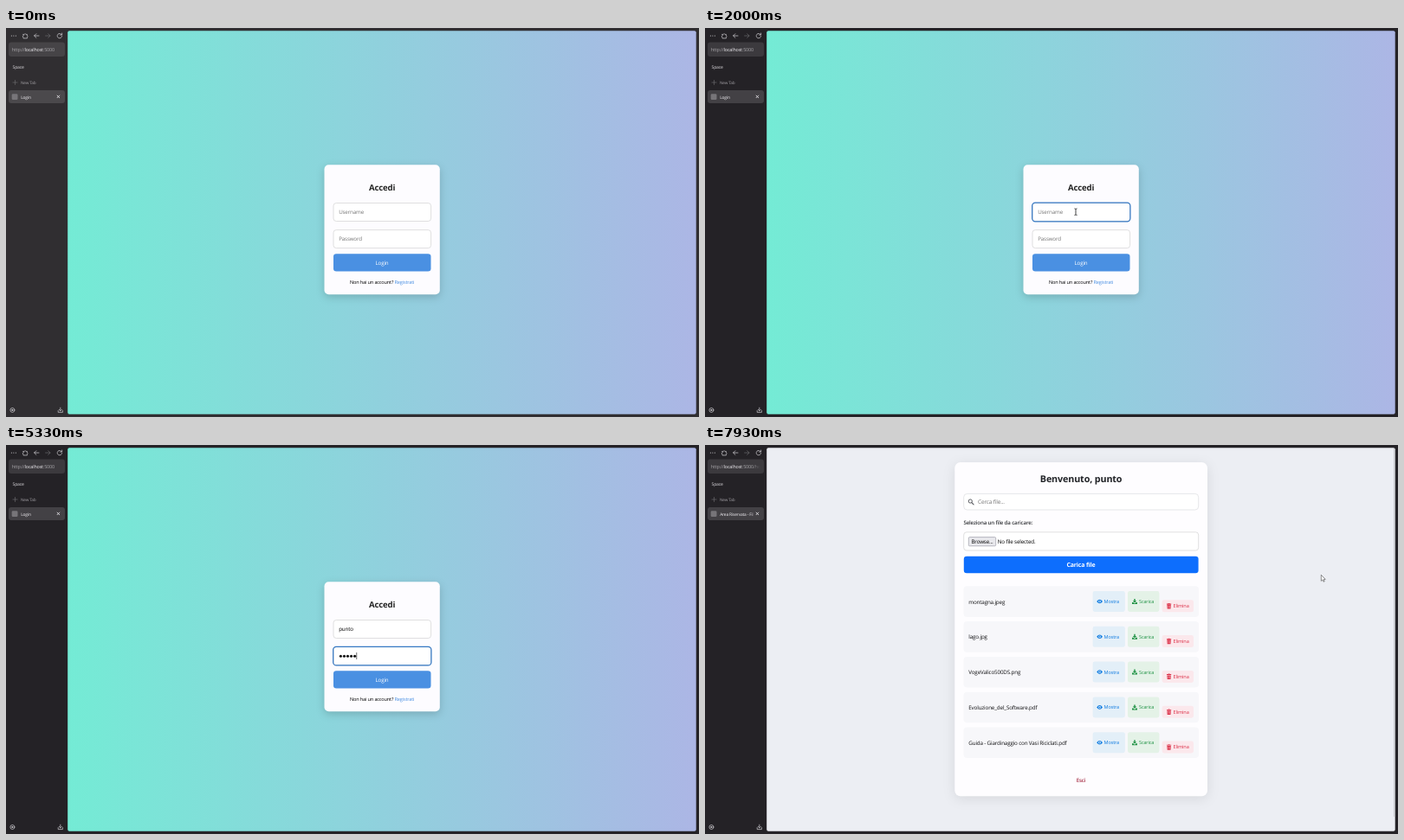
An HTML page for the animation above (8000 ms loop, 800 px wide and 450 px high).

```html
<!DOCTYPE html>
<html lang="it">
<head>
<meta charset="utf-8">
<title>Login</title>
<style>
  html, body { margin: 0; width: 100%; height: 100%; overflow: hidden; background: #242226; }
  svg { display: block; width: 800px; height: 450px; font-weight: 500; letter-spacing: -.01em;
    --frame: #302e31; --box: #464447; --tab: #4b494c; }
  svg.active { --frame: #242226; --box: #3c3a3e; --tab: #434145; }
  text { font-family: "Open Sans", "Noto Sans", sans-serif; text-rendering: geometricPrecision; white-space: pre; }
  .frame { fill: var(--frame); }
  .box { fill: var(--box); }
  .tab { fill: var(--tab); }
  .line { fill: none; stroke: #d2d0d4; stroke-width: .7; stroke-linecap: round; stroke-linejoin: round; }
  .dim { stroke: #69676b; }
  .card { filter: drop-shadow(0 3px 5px rgba(0, 0, 0, .17)); }
  .soft { filter: drop-shadow(0 3px 7px rgba(0, 0, 0, .09)); }
</style>
</head>
<body>
<svg id="stage" viewBox="0 0 800 450" xmlns="http://www.w3.org/2000/svg"></svg>
<script>
const LOOP = 8000;
const USER = 'punto';
const FILES = [
  'montagna.jpeg', 'lago.jpg', 'VogeValico500DS.png',
  'Evoluzione_del_Software.pdf', 'Guida - Giardinaggio con Vasi Riciclati.pdf'
];

// Moments of the session, in ms
const FOCUS = 1430, INVALID = 3930, SUBMIT = 6330, LOADED = 6600, READY = 6870;
const userKeys = [2330, 2400, 2530, 2600, 2800];
const passKeys = [4670, 4800, 4930, 5070, 5270, 5670, 5870, 6070];
const caretResets = [FOCUS, ...userKeys, INVALID, 4170, ...passKeys];
const mousePath = [
  [200, 802, 178], [730, 588.3, 200.3], [1330, 428, 212.7],
  [7070, 428, 212.7], [7370, 306, 258], [7930, 711.3, 150.3]
];

const attrs = o => Object.entries(o).map(([k, v]) => ` ${k}="${v}"`).join('');
const rect = (x, y, w, h, r, o = {}) =>
  `<rect x="${x}" y="${y}" width="${w}" height="${h}" rx="${r}"${attrs(o)}/>`;
const text = (x, y, size, fill, s, o = {}) =>
  `<text x="${x}" y="${y}" font-size="${size}" fill="${fill}"${attrs(o)}>${s}</text>`;
const path = (d, o = {}) => `<path d="${d}"${attrs(o)}/>`;
const group = (id, body, o = {}) => `<g id="${id}"${attrs(o)}>${body}</g>`;
const line = (d, extra = '') => path(d, { class: 'line ' + extra });
const view = fill => rect(71.2, 3.3, 725.5, 443.4, 2, { fill });
const mid = { 'text-anchor': 'middle' };
const semi = { 'font-weight': 600 };
const bold = { 'font-weight': 700 };

function sidebar() {
  const dots = [6.4, 8.9, 11.4].map(x => `<circle cx="${x}" cy="9" r=".6" fill="#d2d0d4"/>`).join('');
  const url = '<tspan>http://</tspan><tspan fill="#f0eef2">localhost</tspan>:5000';
  return rect(0, 0, 800, 450, 0, { class: 'frame' }) + dots
    + line('M20 7.4h1.1a1.1 1.1 0 0 1 2 0h1.3v1.5a1 1 0 0 1 0 1.9v1.1H20v-1.2a1 1 0 0 1 0-1.9z')
    + line('M38 9h-5.4m2.3-2.3L32.6 9l2.3 2.3')
    + line('M45.6 9H51m-2.3-2.3L51 9l-2.3 2.3', 'dim')
    + group('reload', line('M64.3 7.8a2.7 2.7 0 1 0 .3 1.7M64.6 6v2h-2'))
    + group('stop', line('M60 7l4 4m0-4l-4 4'))
    + rect(3, 16.5, 65, 16.5, 3, { class: 'box' })
    + text(6.8, 27, 5.43, '#a9a7ab', url + '<tspan id="route">/home</tspan>', { 'clip-path': 'url(#urlClip)' })
    + group('urlFade', rect(54, 17, 12, 15, 0, { fill: 'url(#fade)' }))
    + text(7.5, 47, 5.1, '#d8d6da', 'Space')
    + line('M8 63h5m-2.5-2.5v5', 'dim')
    + text(17, 65, 4.7, '#a19fa3', 'New Tab')
    + rect(3, 72, 65, 15, 3, { class: 'tab' })
    + group('favicon', rect(6.7, 76.2, 6.8, 6.8, 1.3, { fill: '#777579' }))
    + group('hourglass', line('M8 76.6h4.4M8 82.8h4.4M8.6 76.7v1.5l1.2 1.5-1.2 1.5v1.5M11.8 76.7v1.5l-1.2 1.5 1.2 1.5v1.5'))
    + text(17.2, 81.6, 4.9, '#f4f2f6', '', { id: 'tabTitle', 'clip-path': 'url(#tabClip)' })
    + path('M58.8 77.8l3.2 3.2m0-3.2l-3.2 3.2', { stroke: '#f4f2f6', 'stroke-width': .8 })
    + '<circle cx="7.4" cy="442" r="2.5" class="line"/><circle cx="7.4" cy="442" r="1" fill="#d2d0d4"/>'
    + line('M62.8 439.2v3.6m-1.6-1.5l1.6 1.6 1.6-1.6M60.2 442.6v2h5.2v-2');
}

const field = (id, y) =>
  rect(378, y, 112.6, 21, 3.3, { fill: '#fff', stroke: '#ccc', 'stroke-width': .6 })
  + group(id + 'Ring', rect(377.7, y - .3, 113.2, 21.6, 3.5, { fill: 'none', stroke: '#3578c4', 'stroke-width': 1.25 }));

function loginPage() {
  const dots = passKeys.map((_, i) =>
    `<circle class="dot" cx="${386.4 + 4.05 * i}" cy="244.3" r="1.55" fill="#111"/>`).join('');
  return view('url(#sky)')
    + rect(367.5, 158.3, 133.3, 149.9, 5, { fill: '#fdfcff', class: 'card' })
    + text(434.2, 187.9, 9.6, '#222', 'Accedi', { ...mid, ...bold })
    + field('user', 202.5) + field('pass', 233.6)
    + text(384.2, 215.2, 6.22, '#757575', '', { id: 'userText' })
    + text(384.2, 246.4, 6.22, '#757575', 'Password', { id: 'passHint' }) + dots
    + rect(0, 0, .6, 8, 0, { id: 'caret', fill: '#111' })
    + rect(378, 261.2, 112.5, 20.4, 3.3, { fill: '#4a90e2' })
    + text(434, 273.9, 6.25, '#fff', 'Login', mid)
    + text(434.1, 296.3, 5.6, '#000', 'Non hai un account? <tspan fill="#4a90e2">Registrati</tspan>', mid)
    + group('tip',
        rect(378, 254.8, 69.2, 22.1, 2.2, { fill: '#262528', stroke: '#3c3b3e', 'stroke-width': .5 })
        + text(387.4, 267.3, 4.7, '#f6f5f7', 'Please fill out this field.'));
}

const icons = {
  eye: c => path('M-3.4 0Q0-4.6 3.4 0Q0 4.6-3.4 0z', { fill: c })
    + '<circle r="1.35" fill="#e4f0f9"/>' + `<circle r=".75" fill="${c}"/>`,
  save: c => path('M-.7-3h1.4v2.2h1.6L0 1.4-2.3-.8h1.6zM-3 1h1.4L0 2.5 1.6 1H3v2h-6z', { fill: c }),
  bin: c => path('M-2.6-2.8h1.6l.4-.5h1.2l.4.5h1.6v.9h-5.2zM-2.2-1.5h4.4l-.3 4.7h-3.8z', { fill: c })
    + path('M-.8-.6v2.8M.8-.6v2.8', { stroke: '#fbe8ec', 'stroke-width': .45 })
};

function action(x, y, w, h, bg, ink, icon, label) {
  const cy = y + h / 2;
  return rect(x, y, w, h, 2.4, { fill: bg })
    + `<g transform="translate(${x + 8} ${cy})">${icons[icon](ink)}</g>`
    + text(x + 13, cy + 2, 5.6, ink, label);
}

function fileRow(name, i) {
  return `<g transform="translate(0 ${i * 40.8})">`
    + rect(298.5, 163.3, 271.5, 35.6, 4, { fill: '#f7f7fa' })
    + text(304.3, 183.7, 6.27, '#101012', name)
    + action(447.6, 169, 37.3, 24, '#e3eff8', '#0f7be0', 'eye', 'Mostra')
    + action(488, 169, 36.4, 24, '#e4f2e7', '#219346', 'save', 'Scarica')
    + action(527.6, 179.3, 36.4, 14, '#fbe8ec', '#dc3048', 'bin', 'Elimina')
    + '</g>';
}

function filesPage() {
  const thin = { fill: '#fff', stroke: '#ccc', 'stroke-width': .6 };
  return view('#eceef3')
    + rect(795.2, 4, 1.2, 426, .6, { fill: '#c6c7cb' })
    + rect(288.3, 20, 291.7, 386.2, 6.5, { fill: '#fefdff', class: 'soft' })
    + text(434.1, 43, 10.8, '#222428', 'Benvenuto, ' + USER, { ...mid, ...bold })
    + rect(298.7, 56.4, 271, 18.6, 4, { ...thin, stroke: '#d6d7da' })
    + '<circle cx="306.3" cy="65" r="2.1" fill="none" stroke="#55575c" stroke-width=".95"/>'
    + path('M307.9 66.6l2.2 2.2', { stroke: '#55575c', 'stroke-width': 1.1, 'stroke-linecap': 'round' })
    + text(315, 68.1, 6.5, '#757575', 'Cerca file...')
    + text(298.4, 92.3, 6.2, '#333539', 'Seleziona un file da caricare:', semi)
    + rect(298.7, 100.8, 271, 21.2, 3.3, thin)
    + rect(304.3, 106.6, 31.4, 10.2, 1.2, { fill: '#e9e9ed', stroke: '#8f8f9d', 'stroke-width': .6 })
    + text(320, 114, 6.25, '#000', 'Browse...', mid)
    + text(337.8, 114, 6.27, '#000', 'No file selected.')
    + rect(298.8, 128.8, 270.8, 19.5, 3.3, { fill: '#0d6efd' })
    + text(434, 141.2, 7, '#fff', 'Carica file', { ...mid, ...bold })
    + FILES.map(fileRow).join('')
    + text(434, 389.8, 6.2, '#a8324a', 'Esci', { ...mid, ...semi });
}

const stage = document.getElementById('stage');
stage.innerHTML = `<defs>
  <linearGradient id="sky"><stop offset="0" stop-color="#74ebd5"/><stop offset="1" stop-color="#acb6e5"/></linearGradient>
  <linearGradient id="fade"><stop offset="0" stop-color="#3c3a3e" stop-opacity="0"/><stop offset=".85" stop-color="#3c3a3e"/></linearGradient>
  <clipPath id="urlClip">${rect(5, 17, 60, 16, 0)}</clipPath>
  <clipPath id="tabClip">${rect(16, 73, 39.4, 14, 0)}</clipPath>
  </defs>`
  + sidebar() + group('login', loginPage()) + group('files', filesPage())
  + group('status', rect(71, 438, 110, 8.7, 0, { fill: '#242226' })
      + text(72.8, 444.5, 4.67, '#fbf9fd', 'Transferring data from localhost...'))
  + group('mouse',
      group('arrow', path('M0 0v7l1.6-1.4 1.1 2.3 1.2-.5-1.1-2.3h2.1z',
        { fill: '#fff', stroke: '#444', 'stroke-width': .6, 'stroke-linejoin': 'round' }))
      + group('beam', path('M-1.5-3.8q1.5 0 1.5.8q0-.8 1.5-.8M0-3v6M-1.5 3.8q1.5 0 1.5-.8q0 .8 1.5.8',
        { fill: 'none', stroke: '#222', 'stroke-width': .85 })));

const $ = id => document.getElementById(id);
const show = (id, on) => { $(id).style.display = on ? '' : 'none'; };
const clamp = v => Math.max(0, Math.min(1, v));
const count = (list, t) => list.filter(k => k <= t).length;
const dotEls = [...document.querySelectorAll('.dot')];

function mouseAt(t) {
  const n = count(mousePath.map(p => p[0]), t);
  if (n === 0) return mousePath[0].slice(1);
  if (n === mousePath.length) return mousePath[n - 1].slice(1);
  const [t0, x0, y0] = mousePath[n - 1], [t1, x1, y1] = mousePath[n];
  const u = (t - t0) / (t1 - t0), e = u * u * (3 - 2 * u);
  return [x0 + (x1 - x0) * e, y0 + (y1 - y0) * e];
}

function drawCaret(t, typed, dots) {
  const since = t - caretResets[count(caretResets, t) - 1];
  const on = t >= FOCUS && since % 1000 < 500;
  show('caret', on);
  if (!on) return;
  const inPass = t >= INVALID;
  const x = inPass ? 384.3 + 4.05 * dots
    : 384.2 + (typed ? $('userText').getComputedTextLength() : 0);
  $('caret').setAttribute('x', x);
  $('caret').setAttribute('y', inPass ? 240 : 209);
}

function render(t) {
  const typed = count(userKeys, t), dots = count(passKeys, t);
  const loading = t >= SUBMIT && t < READY, sent = t >= SUBMIT + 70;

  stage.classList.toggle('active', t >= FOCUS);
  show('reload', !loading);
  show('stop', loading);
  show('favicon', !loading);
  show('hourglass', loading);
  show('route', sent);
  show('urlFade', sent);
  $('tabTitle').textContent = sent ? 'Area Riservata - File' : 'Login';
  show('login', t < LOADED);
  show('files', t >= LOADED);
  show('status', sent && t < READY);
  $('status').style.opacity = clamp((READY - t) / 200);

  $('userText').textContent = typed ? USER.slice(0, typed) : 'Username';
  $('userText').setAttribute('fill', typed ? '#000' : '#757575');
  show('userRing', t >= FOCUS && t < INVALID);
  show('passRing', t >= INVALID);
  show('passHint', !dots);
  dotEls.forEach((d, i) => { d.style.display = i < dots ? '' : 'none'; });
  const tipEnd = passKeys[0] + 130;
  show('tip', t >= INVALID && t < tipEnd);
  $('tip').style.opacity = Math.min(clamp((t - INVALID) / 200), clamp((tipEnd - t) / 130));
  if (t < LOADED) drawCaret(t, typed, dots);

  const [x, y] = mouseAt(t);
  const overField = t < SUBMIT && x > 378 && x < 491 && y > 202 && y < 224;
  show('mouse', t >= mousePath[0][0] && (t < userKeys[0] || t >= SUBMIT));
  show('arrow', !overField);
  show('beam', overField);
  $('mouse').setAttribute('transform', `translate(${x} ${y})`);
}

function tick() {
  render(performance.now() % LOOP);
  requestAnimationFrame(tick);
}
tick();
</script>
</body>
</html>
```
